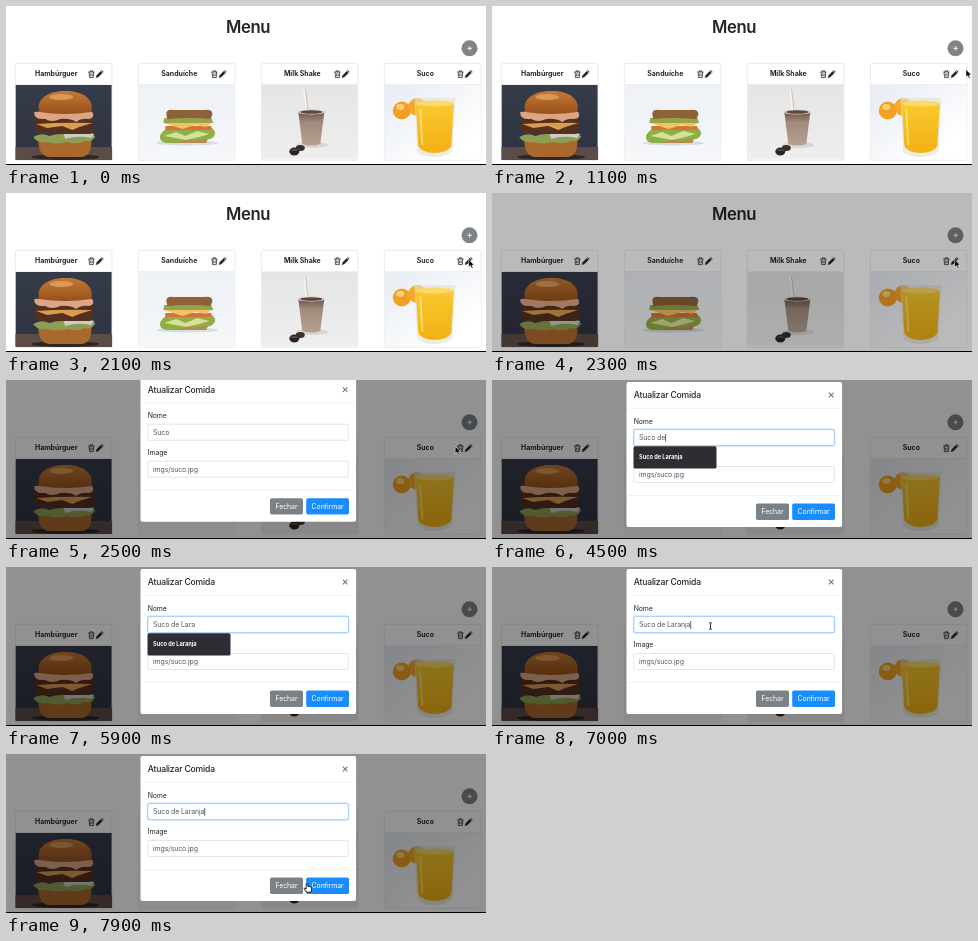
These frames come from a looping animation (480x159 px, 8 s). An HTML page:

```html
<!DOCTYPE html>
<html lang="pt">
<meta charset="utf-8">
<title>Menu</title>
<style>
html, body { margin: 0; width: 100%; height: 100%; overflow: hidden; background: #fff }
svg { display: block; width: 480px; height: 159px }
text { font: 6.95px Inter, sans-serif; letter-spacing: -.015em; fill: #212529; white-space: pre }
.h1 { font-size: 16.7px; font-weight: 600; letter-spacing: -.025em }
.h5 { font-size: 8.6px; font-weight: 500; letter-spacing: -.02em }
.bold { font-weight: 700; letter-spacing: 0 }
.mid { text-anchor: middle }
.field { fill: #fff; stroke: #ced4da; stroke-width: .6 }
.value { fill: #50565c }
.light { fill: #fff }
.tip { font-size: 5.6px; font-weight: 700; letter-spacing: 0; fill: #fff }
</style>
<svg viewBox="0 0 480 159">
  <defs>
    <linearGradient id="night" x2="0" y2="1"><stop stop-color="#363b49"/><stop offset="1" stop-color="#2f3341"/></linearGradient>
    <linearGradient id="pale" x2="0" y2="1"><stop stop-color="#eef1f5"/><stop offset="1" stop-color="#f5f7f9"/></linearGradient>
    <linearGradient id="grey" x2="0" y2="1"><stop stop-color="#e6e5e5"/><stop offset="1" stop-color="#efeeee"/></linearGradient>
    <linearGradient id="bright" x2="1" y2="1"><stop offset=".1" stop-color="#e9eef4"/><stop offset=".8" stop-color="#fff"/></linearGradient>
    <linearGradient id="bun" x2="0" y2="1"><stop stop-color="#c37a35"/><stop offset="1" stop-color="#98501c"/></linearGradient>
    <linearGradient id="shake" x2="0" y2="1"><stop stop-color="#6b544a"/><stop offset=".3" stop-color="#a28a7b"/><stop offset="1" stop-color="#b5a092"/></linearGradient>
    <linearGradient id="juice" x2="0" y2="1"><stop stop-color="#f8c92f"/><stop offset="1" stop-color="#f3b013"/></linearGradient>
    <clipPath id="photo"><path d="M0 79H97V154H0Z"/></clipPath>
    <g id="tools" fill="none" stroke="#212529" stroke-width=".75">
      <path d="M73 66H79.2M74.9 66V64.8H77.3V66M73.8 66L74.2 71.6H78L78.4 66M75.4 67.5V70.3M76.8 67.5V70.3"/>
      <path d="M80.7 71.8L81.3 69.4L85.4 65.3L87.1 67L83 71.1ZM86 64.7L86.5 64.3L88.1 65.9L87.7 66.4Z" fill="#212529" stroke-width=".3"/>
    </g>
  </defs>
  <rect width="480" height="159" fill="#fff"/>
  <text class="h1 mid" x="242" y="27">Menu</text>
  <circle cx="463.5" cy="42.3" r="8" fill="#7e8488"/>
  <path d="M461.5 42.3H465.9M463.7 40.1V44.5" stroke="#fff" stroke-width=".9"/>
  <g id="cards"></g>
  <rect id="shade" width="480" height="159"/>
  <path d="M0 158H480V159H0Z"/>
  <g id="modal">
    <rect x="134.5" y="2" width="215.6" height="145" rx="2" fill="#fff"/>
    <path d="M134.5 28.3H350M134.5 115.5H350" stroke="#e3e6e9" stroke-width=".5"/>
    <text class="h5" x="141.7" y="18.3">Atualizar Comida</text>
    <path d="M336.9 12.7L341.5 17.3M341.5 12.7L336.9 17.3" stroke="#7c7c7c" stroke-width="1.2"/>
    <text x="141.7" y="43.6">Nome</text>
    <rect id="glow" x="140.9" y="48.6" width="202.4" height="18" rx="2.4" fill="#bfdeff"/>
    <rect id="name" class="field" x="141.9" y="49.6" width="200.4" height="16" rx="1.7"/>
    <text id="typed" class="value" x="147" y="60.2"></text>
    <path id="caret" d="M0 54V61.7" stroke="#222" stroke-width=".7"/>
    <text x="141.7" y="80.2">Image</text>
    <rect class="field" x="141.9" y="86.5" width="200.4" height="16" rx="1.7"/>
    <text class="value" x="147" y="97">imgs/suco.jpg</text>
    <rect x="264" y="123.6" width="33" height="16.3" rx="1.7" fill="#7a8187"/>
    <text class="light mid" x="280.5" y="134.2">Fechar</text>
    <rect x="300.2" y="123.6" width="42.8" height="16.3" rx="1.7" fill="#198cff"/>
    <text class="light mid" x="321.6" y="134.2">Confirmar</text>
    <g id="hint">
      <rect x="141.5" y="66.3" width="83" height="22.2" rx="1.6" fill="#2f2d33"/>
      <text class="tip" x="147" y="79.4">Suco de Laranja</text>
    </g>
  </g>
  <g id="mouse">
    <path id="arrow" d="M0 0V7.6L1.8 6L3 8.7L4.3 8.1L3.1 5.5H5.4Z" stroke="#fff" stroke-width=".5"/>
    <path id="beam" d="M-1.4 -3.4Q0 -3.4 0 -2.4Q0 -3.4 1.4 -3.4M0 -2.4V2.4M-1.4 3.4Q0 3.4 0 2.4Q0 3.4 1.4 3.4" fill="none" stroke="#111" stroke-width=".9"/>
    <path id="hand" d="M-.8 .6Q0 -.6 .8 .6V3.2L4.6 4.1Q5 7 3.9 9.2H-.5L-3 5.6Q-2.6 4.4 -.8 6Z" fill="#fff" stroke="#111" stroke-width=".9"/>
  </g>
</svg>
<script>
const $ = id => document.getElementById(id);
const shape = (fill, d) => `<path fill="${fill}" d="${d}"/>`;
const ball = (fill, x, y, rx, ry = rx) => `<ellipse fill="${fill}" cx="${x}" cy="${y}" rx="${rx}" ry="${ry}"/>`;

// name, backdrop, picture; coordinates are relative to the card's left edge
const foods = [
  ['Hambúrguer', 'night',
    shape('#5c4c47', 'M0 141H97V154H0Z') + ball('#2e2624', 50, 151, 34, 3) +
    shape('#a9682c', 'M23 134H76Q77 149 67 151H33Q23 149 23 134Z') +
    shape('#8f9d52', 'M18 131Q26 126 34 130Q46 126 55 130Q70 126 80 130Q77 137 70 135Q62 139 52 136Q40 139 33 136Q22 138 18 131Z') +
    shape('#c9cdc4', 'M48 128Q64 124 79 128L76 132Q62 129 50 133Z') +
    shape('#55301f', 'M20 113Q50 109 77 112Q80 123 75 128H24Q17 122 20 113Z') +
    shape('#d99c50', 'M21 118Q50 116 77 117L64 121L57 124L47 120L32 122Z') +
    shape('#dca684', 'M19 106Q50 103 77 106Q80 112 73 113Q66 112 61 116Q55 112 45 113Q36 117 30 113Q18 114 19 106Z') +
    shape('url(#bun)', 'M24 106C20 92 34 85 50 85C68 85 79 93 76 106Q50 110 24 106Z') +
    ball('#d99a58', 46, 91, 12, 3)],
  ['Sanduíche', 'pale',
    ball('#dadde0', 49, 137, 31, 2.5) +
    shape('#b98950', 'M30 127H72L68 137H35Z') +
    shape('#8fae45', 'M22 129Q27 120 38 122Q52 118 63 121Q74 118 77 127Q75 135 66 133Q57 137 49 133Q39 138 33 137Q20 138 22 129Z') +
    shape('#d5e09a', 'M26 130L38 126L47 130L59 125L71 128L61 131L48 134L37 132Z') +
    shape('#d9713b', 'M27 120H73V124H27Z') +
    shape('#f0c464', 'M26 117L74 116L68 121L57 119L44 123Z') +
    shape('#93a548', 'M26 112H73L75 117H25Z') +
    shape('#8f6139', 'M28 108Q28 103 35 104H66Q75 103 74 109L72 113Q50 111 29 113Z')],
  ['Milk Shake', 'grey',
    ball('#d8d6d4', 51, 139, 16, 3) +
    '<path d="M43 83L46 108" stroke="#f7f4ef" stroke-width="2.2"/><path d="M44.2 83L47 108" stroke="#b99" stroke-width=".6"/>' +
    shape('url(#shake)', 'M37 106H63L59 138Q50 141 41 138Z') +
    ball('#d5cac2', 50, 106, 13.5, 2.6) +
    ball('#5c483f', 50, 106, 11, 1.7) +
    ball('#2b2423', 33, 145.5, 5, 4) + ball('#3a302d', 39, 142, 4.5, 3) + ball('#7d716c', 33, 144, 3.6, .6)],
  ['Suco', 'bright',
    ball('#f2a022', 17.5, 104.5, 9) + ball('#f5a829', 33, 101, 9) + ball('#fad27b', 16, 101, 4, 3) +
    shape('#e3e1d399', 'M30 92H71L68 146Q62 151 50 151Q38 151 33 146Z') +
    shape('url(#juice)', 'M31.5 98H69.5L67 140Q63 147 50 147Q38 147 34 140Z') +
    ball('#fada69', 50.5, 97.5, 19, 3) +
    '<path d="M36 103L38 139" stroke="#fbd96c" stroke-width="2"/>']
];
$('cards').innerHTML = foods.map(([name, back, art], i) => `
  <g transform="translate(${9.3 + i * 123} 0)">
    <rect y="57.3" width="96.6" height="97" rx="1.5" fill="#fff" stroke="#dcdcdc" stroke-width=".6"/>
    <path d="M0 78.6H96.6" stroke="#dcdcdc" stroke-width=".5"/>
    <text class="bold mid" x="41" y="70.4">${name}</text>
    <use href="#tools"/>
    <g clip-path="url(#photo)"><path d="M.3 79H96.3V153.6H.3Z" fill="url(#${back})"/>${art}</g>
  </g>`).join('');

const LOOP = 8000, STEP = 100;
const FULL = 'Suco de Laranja';
// moments at which each letter after "Suco" is typed
const keys = [4100, 4300, 4500, 4600, 4900, 5000, 5200, 5400, 6300, 6500, 6700];
const FOCUS = 3500;
// time, x, y
const path = [[900, 483, 62], [1100, 474, 63.5], [1900, 462.7, 66.6], [2400, 462.7, 66.6],
  [3100, 218.5, 59], [7000, 218.5, 59], [7900, 301, 129]];

const clamp = v => Math.min(1, Math.max(0, v));
const show = (id, on) => $(id).setAttribute('visibility', on ? 'inherit' : 'hidden');

function pointer(t) {
  const next = path.findIndex(p => p[0] > t);
  if (next < 1) return next ? path.at(-1).slice(1) : path[0].slice(1);
  const [a, b] = [path[next - 1], path[next]];
  const u = (t - a[0]) / (b[0] - a[0]), e = u * u * (3 - 2 * u);
  return [a[1] + (b[1] - a[1]) * e, a[2] + (b[2] - a[2]) * e];
}

function draw(t) {
  $('shade').setAttribute('opacity', .43 * clamp((t - 2200) / 160));
  const slide = clamp((t - 2350) / 300);
  $('modal').setAttribute('opacity', clamp((t - 2350) / 150));
  $('modal').setAttribute('transform', `translate(0 ${-21.5 * (1 - slide) ** 2})`);

  const count = keys.filter(k => k <= t).length;
  const focused = t >= FOCUS;
  const last = count ? keys[count - 1] : FOCUS;
  $('typed').textContent = FULL.slice(0, 4 + count);
  show('glow', focused);
  $('name').style.stroke = focused ? '#80bdff' : '';
  show('caret', focused && (t - last) % 1000 < 500);
  $('caret').setAttribute('transform', `translate(${147.4 + $('typed').getComputedTextLength()} 0)`);
  show('hint', t >= keys[0] && t < keys.at(-1));

  const [x, y] = pointer(t);
  const open = t > 2700;
  const inField = open && x > 142 && x < 342 && (y > 49 && y < 66 || y > 86 && y < 103);
  const onButton = open && y > 123 && y < 140 && x > 264 && x < 343;
  show('mouse', t >= 900 && (t < keys[0] || t >= 7000));
  $('mouse').setAttribute('transform', `translate(${x} ${y})`);
  show('beam', inField);
  show('hand', onButton);
  show('arrow', !inField && !onButton);
}

function tick() {
  draw(Math.floor(performance.now() % LOOP / STEP) * STEP);
  requestAnimationFrame(tick);
}
tick();
</script>
</html>
```
